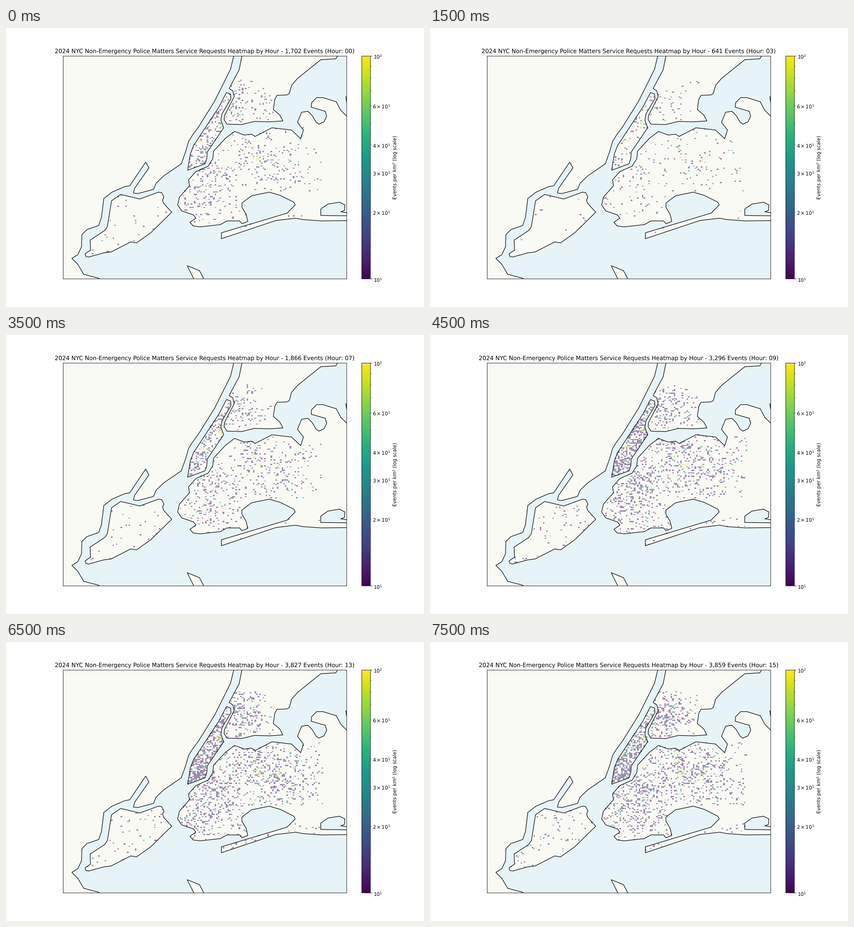
Animation of 917 by 611 pixels, one loop 8 s. Source, as a matplotlib script:

```python
import numpy as np
import matplotlib.pyplot as plt
from matplotlib.animation import FuncAnimation
from matplotlib.cm import ScalarMappable
from matplotlib.colors import LogNorm
from matplotlib.patches import Polygon
from matplotlib.path import Path

plt.rcParams["text.hinting"] = "no_hinting"

W, H, DPI = 917, 611, 76.4
L, R, T, B = 124.5, 746.5, 61.5, 549.5   # map box in pixels
DX, DY = 3.5, 2.6                        # heatmap cell
KM2 = 0.085                              # area of one cell
HOURS = 16
WATER, LAND = "#e6f3f7", "#f9faf4"
TITLE = ("2024 NYC Non-Emergency Police Matters Service Requests Heatmap "
         "by Hour - {:,} Events (Hour: {:02d})")

# Key points of the coastlines, in pixels
jersey = [(499, 40), (499, 61), (492, 90), (457, 160), (422, 216), (408, 235),
          (400, 248), (393, 272), (384, 297), (346, 323), (329, 339),
          (323, 353), (289, 362), (279, 361), (282, 350), (313, 306),
          (306, 293), (271, 345), (260, 347), (232, 359), (214, 373),
          (209, 414), (203, 432), (177, 441), (166, 452), (165, 479),
          (157, 496), (144, 504), (157, 517), (170, 539), (201, 547),
          (212, 552), (100, 570), (100, 40)]
staten = [(251, 364), (293, 374), (334, 359), (341, 360), (346, 370),
          (343, 376), (345, 383), (363, 403), (317, 448), (286, 470),
          (273, 468), (230, 490), (214, 492), (181, 501), (175, 500),
          (173, 494), (185, 486), (184, 464), (216, 443), (222, 434),
          (231, 378)]
manhattan = [(483, 141), (492, 144), (493, 154), (473, 188), (471, 202),
             (477, 218), (441, 271), (440, 285), (436, 297), (398, 311),
             (404, 275), (411, 257), (467, 172)]
bronx = [(517, 40), (517, 61), (511, 91), (489, 132), (497, 137), (500, 150),
         (479, 191), (478, 200), (484, 210), (516, 211), (545, 204),
         (577, 205), (607, 203), (600, 190), (586, 178), (589, 156),
         (594, 147), (616, 146), (621, 143), (626, 125), (639, 110),
         (690, 69), (723, 67), (740, 40)]
north_shore = [(765, 210), (734, 180), (724, 161), (695, 152), (681, 152),
               (670, 163), (669, 173), (700, 182), (703, 193), (697, 205),
               (686, 210), (680, 206), (671, 191), (662, 182), (648, 184),
               (639, 206), (652, 223), (646, 242), (626, 223), (583, 218),
               (546, 237), (538, 232), (522, 234), (501, 226), (481, 241),
               (455, 269), (453, 286), (443, 302), (416, 314), (400, 332),
               (402, 345), (380, 370), (376, 387)]
south_shore = [(385, 400), (411, 409), (416, 416), (403, 425), (410, 433),
               (425, 435), (470, 430), (484, 422), (512, 422), (517, 428),
               (530, 423), (526, 407), (517, 392), (517, 383), (538, 367),
               (577, 359), (601, 366), (631, 381), (634, 387), (616, 405),
               (472, 448), (472, 461), (592, 421), (635, 416), (650, 419),
               (692, 422), (765, 421), (765, 411), (690, 410), (690, 396),
               (706, 385), (731, 381), (743, 387), (742, 399), (734, 402),
               (765, 407)]
hook = [(397, 520), (424, 531), (440, 562), (418, 562)]
islet = [(765, 130), (745, 151), (747, 163)]
BOROUGHS = [manhattan, bronx, north_shore + south_shore, staten]
COASTS = BOROUGHS + [jersey, hook, islet]

# Busy areas (x, y, radius, chance) and spots that stay hot
AREAS = [(514, 162, 29, .32), (468, 319, 17, .22), (442, 358, 43, .21),
         (533, 265, 28, .17), (605, 298, 42, .19)]
HOT = [(428, 248), (552, 287), (598, 291), (541, 262), (469, 209)]

cols, rows = int((R - L) / DX), int((B - T) / DY)
gx, gy = np.meshgrid(L + DX * (np.arange(cols) + .5),
                     T + DY * (np.arange(rows) + .5))


def inside(coast):
    pts = np.column_stack([gx.ravel(), gy.ravel()])
    return Path(coast).contains_points(pts).reshape(gx.shape)


city = np.any([inside(b) for b in BOROUGHS], axis=0)
city &= (gy > 107) & (gx < np.where(gy < 218, 590, 695))
city &= (gx < 520) | (gy < 357) | (gy > 396)
base = .035 + sum(w * np.exp(-((gx - x) ** 2 + (gy - y) ** 2) / (2 * r * r))
                  for x, y, r, w in AREAS)
downtown = inside(manhattan)
rough = np.random.default_rng(5).gamma(2, .5, gx.shape)


def event_count(hour):
    """Total events: falls until 03, climbs steeply in the morning."""
    keys = [0, 3, 5, 7, 9, 11, 13, 15]
    totals = [1702, 641, 720, 1866, 3296, 3934, 3827, 3859]
    return round(np.exp(np.interp(hour, keys, np.log(totals))))


def heat(hour):
    """Events per km² on the grid, NaN where nothing happened."""
    rng = np.random.default_rng(100 + hour)
    level = (event_count(hour) / 3900) ** .86
    # Manhattan leans uptown at night and downtown by day
    lean = np.exp((gy - 225) / 80 * (level - .5))
    chance = np.where(downtown, .42 * lean, base) * city * rough * level
    events = rng.geometric(.77, gx.shape).astype(float)
    events[rng.random(gx.shape) > 1.1 * chance] = np.nan
    for x, y in HOT:
        k = 2 + int(5 * level)
        col = ((rng.normal(x, 3.5, k) - L) / DX).astype(int)
        row = ((rng.normal(y, 3.5, k) - T) / DY).astype(int)
        events[row, col] = rng.integers(4, 13, k)
    return events / KM2


def box(x0, x1):
    return [x0 / W, 1 - B / H, (x1 - x0) / W, (B - T) / H]


fig = plt.figure(figsize=((W + .01) / DPI, (H + .01) / DPI), dpi=DPI,
                 facecolor="white")
ax = fig.add_axes(box(L, R), facecolor=WATER)
norm = LogNorm(10, 100)
image = ax.imshow(heat(0), extent=(L, L + cols * DX, T + rows * DY, T),
                  aspect="auto", cmap="viridis", norm=norm, alpha=.5,
                  interpolation="nearest", zorder=2)
for coast in COASTS:
    shape = np.array(coast) + .5         # pixel centres
    ax.add_patch(Polygon(shape, fc=LAND, ec="none", zorder=1))
    ax.add_patch(Polygon(shape, fill=False, ec="black", lw=1.15, zorder=3))
ax.set(xlim=(L, R), ylim=(B, T), xticks=[], yticks=[])
title = ax.set_title(TITLE.format(event_count(0), 0), fontsize=12)

cax = fig.add_axes(box(779.5, 798.5))
fig.colorbar(ScalarMappable(norm, "viridis"), cax=cax,
             label="Events per km² (log scale)")


def update(hour):
    image.set_data(heat(hour))
    title.set_text(TITLE.format(event_count(hour), hour))
    return image, title


anim = FuncAnimation(fig, update, frames=HOURS, interval=500,
                     repeat=True, repeat_delay=0, blit=False)
plt.show()
```
